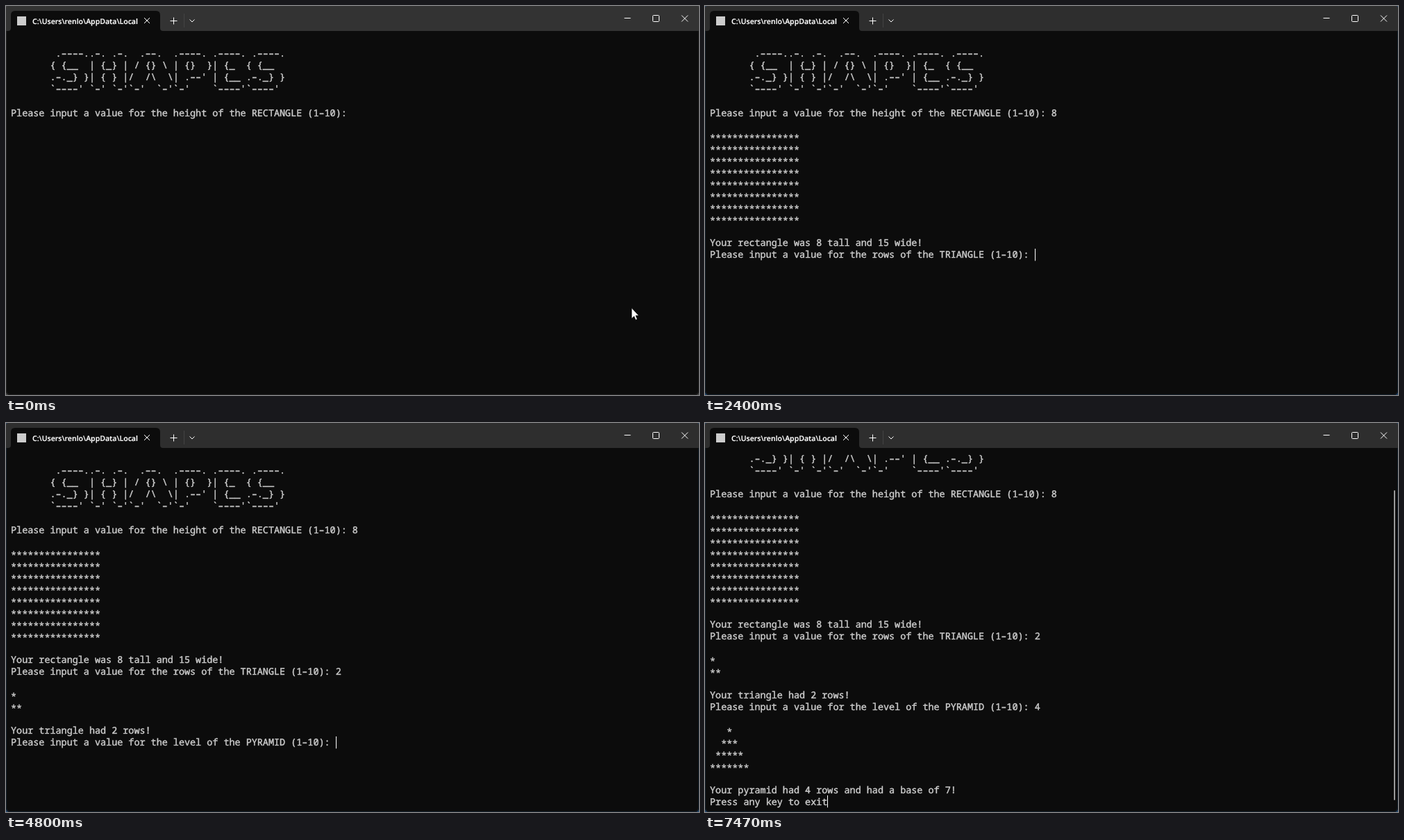
Write an HTML page that moves like this. It is 998x561 px and loops after 8 s.

```html
<!DOCTYPE html>
<html lang="en">
<head>
<meta charset="utf-8">
<title>Shapes</title>
<style>
  html, body { margin: 0; width: 100%; height: 100%; overflow: hidden; background: #0c0c0c; }
  svg { display: block; width: 998px; height: 561px; }
  text { white-space: pre; text-rendering: geometricPrecision; }
  #lines { font: 500 13.44px "Noto Sans Mono", "DejaVu Sans Mono", monospace;
           fill: #ccc; stroke: #ccc; stroke-width: .45; }
  #tabTitle { font: 600 10.55px "Open Sans", "Noto Sans", sans-serif;
              fill: #fff; stroke: #fff; stroke-width: .2; }
  .icon { fill: none; stroke: #fff; stroke-width: 1; }
</style>
</head>
<body>
<svg viewBox="0 0 998 561">
  <rect width="998" height="561" fill="#0c0c0c"/>
  <g id="lines"></g>
  <rect id="caret" width="1" height="17.5" fill="#fff"/>
  <rect id="scrollbar" x="992" y="97" width="2" height="447" rx="1" fill="#9a9a9a"/>

  <rect id="bar" width="998" height="36"/>
  <path d="M3 36Q7 36 7 32V13Q7 7 13 7H216Q222 7 222 13V32Q222 36 226 36Z" fill="#0c0c0c"/>
  <rect x="16" y="15" width="13" height="13" fill="#ccc"/>
  <text id="tabTitle" x="38" y="26">C:\Users\renlo\AppData\Local</text>
  <g class="icon">
    <path d="M199 17l8 8m0-8l-8 8"/>
    <path d="M236.5 21.5h10m-5-5v10"/>
    <path d="M264.5 19.5l3.5 3.5 3.5-3.5"/>
    <path d="M256.5 11v20" stroke="#444"/>
    <path d="M890.5 17.5h9"/>
    <rect x="931.5" y="13.5" width="9" height="9" rx="1"/>
    <path d="M973 13.5l9 9m0-9l-9 9"/>
  </g>
  <path id="corners" d="M0 555Q0 561 6 561H0ZM998 555Q998 561 992 561H998ZM0 3Q0 0 3 0H0ZM998 3Q998 0 995 0H998Z"/>
  <path id="frame" d="M.5 36V554Q.5 560.5 7 560.5H991Q997.5 560.5 997.5 554V36" fill="none"/>
  <path id="pointer" d="M0 0V15.2L3.5 12 5.8 17.2 8.1 16.2 5.9 11.1H10.3Z"
        fill="#fff" stroke="#000" stroke-width=".6"/>
</svg>
<script>
const LOOP = 8000, LEFT = 7, TOP = 42.8, CELL = 8.064, PITCH = 17.05, BLINK = 533;
const $ = id => document.getElementById(id);

const banner = String.raw`
        .----..-. .-.  .--.  .----. .----. .----.
       { {__  | {_} | / {} \ | {}  }| {_  { {__
       .-._} }| { } |/  /\  \| .--' | {__ .-._} }
       ~----' ~-' ~-'~-'  ~-'~-'    ~----'~----'`.replaceAll("~", "`").split("\n");

const prompt = what => `Please input a value for the ${what} (1-10): `;
const stars = n => "*".repeat(n);
const range = n => [...Array(n).keys()];

const first = [...banner, "", prompt("height of the RECTANGLE")];
const answer = (lines, key) => [...lines.slice(0, -1), lines.at(-1) + key];
const firstDone = answer(first, 8);
const second = [...firstDone, "", ...range(8).map(() => stars(16)), "",
  "Your rectangle was 8 tall and 15 wide!", prompt("rows of the TRIANGLE")];
const secondDone = answer(second, 2);
const third = [...secondDone, "", ...range(2).map(i => stars(i + 1)), "",
  "Your triangle had 2 rows!", prompt("level of the PYRAMID")];
const thirdDone = answer(third, 4);
const last = [...thirdDone, "", ...range(4).map(i => " ".repeat(3 - i) + stars(2 * i + 1)), "",
  "Your pyramid had 4 rows and had a base of 7!", "Press any key to exit"];

const scenes = [
  { at: 0, lines: first, blinkFrom: 270 },
  { at: 2000, lines: firstDone },
  { at: 2400, lines: second },
  { at: 4200, lines: secondDone },
  { at: 4800, lines: third },
  { at: 6870, lines: thirdDone },
  { at: 7470, lines: last, scroll: 3 },
];

// Asterisk rows sit lower so the stars are centred in their cells.
function lineMarkup(line, row) {
  const drop = /^[ *]+$/.test(line) ? 2.3 : 0;
  const y = Math.round(TOP + row * PITCH + 13.4) + drop;
  return `<text x="${LEFT}" y="${y}">${line.replaceAll("-", "–")}</text>`;
}

let shown;
function showScene(scene) {
  if (scene === shown) return;
  shown = scene;
  const visible = scene.lines.slice(scene.scroll || 0);
  $("lines").innerHTML = visible.map(lineMarkup).join("");
  $("caret").setAttribute("x", Math.round(LEFT + visible.at(-1).length * CELL));
  $("caret").setAttribute("y", Math.round(TOP + (visible.length - 1) * PITCH));
  $("scrollbar").style.display = scene.scroll ? "" : "none";
}

function caretOn(t, scene) {
  const age = t - (scene.blinkFrom ?? scene.at);
  if (age < 0) return false;
  // Output scenes hold the caret slightly longer before the first blink.
  const lag = scene.blinkFrom ? 0 : 65;
  return Math.floor(Math.max(0, age - lag) / BLINK) % 2 === 0;
}

function render(t) {
  const scene = scenes.findLast(s => t >= s.at);
  showScene(scene);
  $("caret").style.display = caretOn(t, scene) ? "" : "none";

  const focused = t >= 200;
  $("bar").setAttribute("fill", focused ? "#2e2e2e" : "#333");
  $("corners").setAttribute("fill", focused ? "#24486e" : "#444");
  $("frame").setAttribute("stroke", focused ? "#15202c" : "#222");

  const step = t < 70 ? 0 : Math.min(4, 1 + Math.floor((t - 70) / 66.6));
  $("pointer").setAttribute("transform", `translate(${901 + step * 8.2} ${435.5 + step * 2.3})`);
  $("pointer").style.display = t < 2000 ? "" : "none";
}

const start = performance.now();
function tick() {
  render((performance.now() - start) % LOOP);
  requestAnimationFrame(tick);
}
tick();
</script>
</body>
</html>
```
